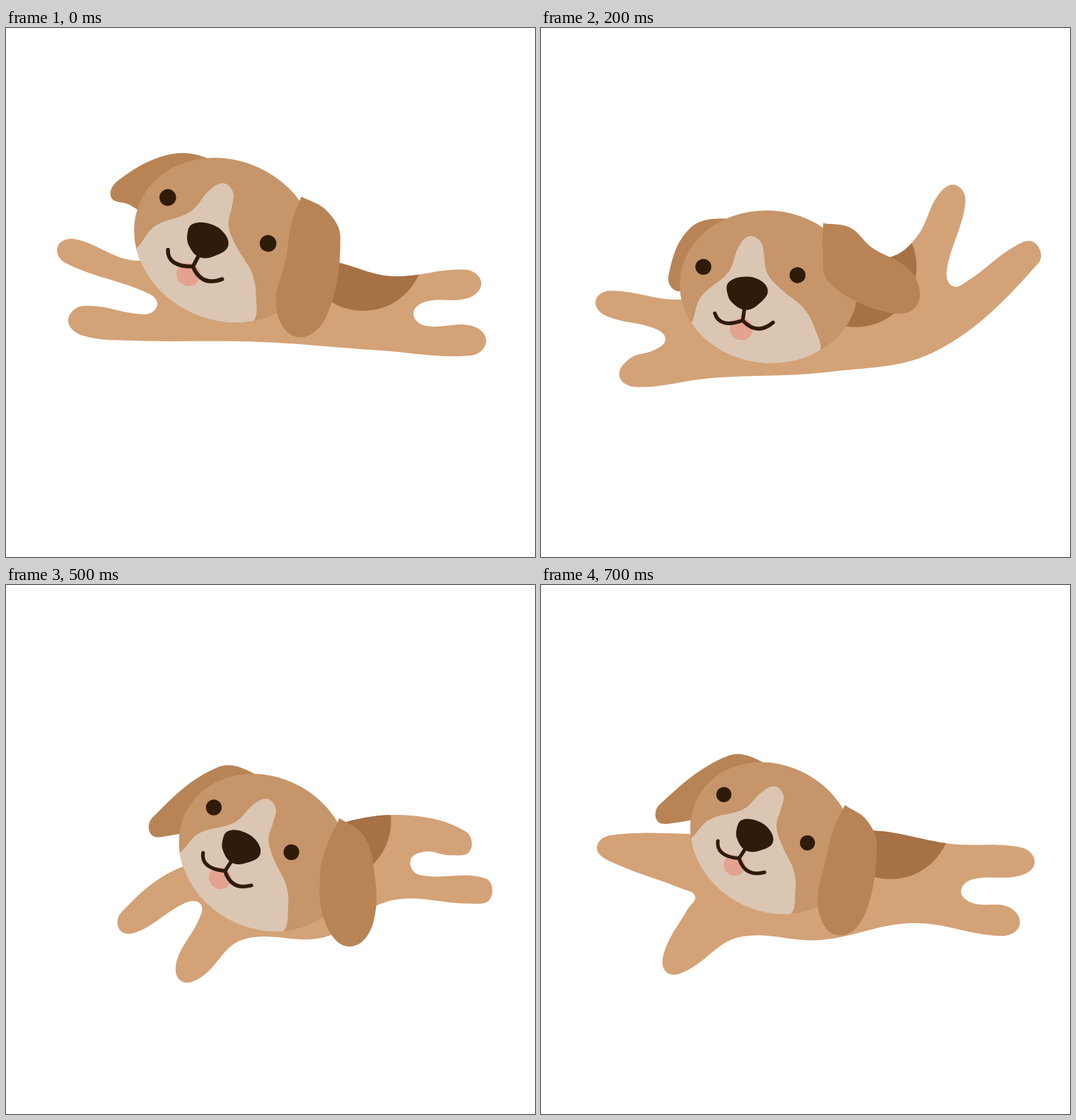
An HTML page with a canvas that plays this animation: 748 by 748 pixels, repeating every 800 ms.

```html
<!DOCTYPE html>
<html lang="en">
<head>
<meta charset="utf-8">
<title>Running puppy</title>
<style>
  html, body { margin: 0; width: 100%; height: 100%; overflow: hidden; background: #fff; }
  canvas { display: block; width: 100%; height: 100%; }
</style>
</head>
<body>
<canvas id="stage" width="748" height="748"></canvas>
<script>
const SIZE = 748, STEP = 100;
const ctx = document.getElementById('stage').getContext('2d');

const COLOR = {
  body: '#d4a277', patch: '#a57145', ear: '#b88456', head: '#c69569',
  muzzle: '#dbc6b4', dark: '#2f1b0a', tongue: '#e4a290'
};

// Paws and the gaps between legs are rounded tips: x, y, heading in degrees.
// Ear tips are relative to the head; turn is the distance between the eyes.
const reach = {
  head: { x: 310, y: 300, tilt: 24.6, size: 1, turn: 156 },
  farTip: [-172, 12], nearTip: [150, 82], saddle: [505, 314],
  shoulder: [187, 329],
  front: [[73, 309, 200], [214, 391, 5], [88, 414, 180]],
  belly: [[180, 442], [360, 444], [530, 456]],
  hind: [[679, 442, 0], [576, 404, 180], [672, 360, -5]],
  back: [[545, 351], [467, 331]]
};
const kick = {
  head: { x: 313, y: 325, tilt: 27, size: 0.98, turn: 145 },
  farTip: [-167, 60], nearTip: [163, 58], saddle: [462, 290],
  shoulder: [188, 341],
  front: [[69, 358, 181], [192, 404, 0], [105, 450, 170]],
  belly: [[260, 448], [430, 462], [590, 447]],
  hind: [[698, 362, -35], [588, 389, 133], [630, 258, -55]],
  back: [[549, 317], [476, 336]]
};
const lift = {
  head: { x: 322, y: 366, tilt: 5, size: 0.955, turn: 140 },
  farTip: [-135, 18], nearTip: [220, 10], saddle: [445, 337],
  shoulder: [196, 384],
  front: [[77, 386, 190], [176, 440, 0], [111, 493, 165]],
  belly: [[240, 495], [410, 486], [560, 456]],
  hind: [[697, 303, -58], [582, 365, 115], [586, 222, -75]],
  back: [[533, 293], [497, 323]]
};
const glide = {
  head: { x: 367, y: 345, tilt: 30, size: 1, turn: 134 },
  farTip: [-155, 60], nearTip: [178, 65], saddle: [420, 355],
  shoulder: [241, 370],
  front: [[117, 450, 155], [240, 430, -40], [197, 540, 125]],
  belly: [[292, 487], [450, 499], [565, 425]],
  hind: [[734, 378, 15], [551, 348, 165], [645, 271, -5]],
  back: [[545, 277], [507, 315]]
};
const land = {
  head: { x: 363, y: 412, tilt: 30, size: 0.89, turn: 134 },
  farTip: [-165, 62], nearTip: [185, 50], saddle: [497, 313],
  shoulder: [250, 430],
  front: [[206, 527, 122], [310, 472, -40], [298, 580, 122]],
  belly: [[377, 516], [450, 497], [521, 468]],
  hind: [[635, 510, 50], [593, 430, 225], [667, 481, 70]],
  back: [[600, 375], [458, 354]]
};
const push = {
  head: { x: 327, y: 358, tilt: 30, size: 0.91, turn: 150 },
  farTip: [-168, 66], nearTip: [163, 80], saddle: [494, 330],
  shoulder: [211, 352],
  front: [[79, 371, 183], [218, 440, -15], [178, 548, 128]],
  belly: [[280, 498], [395, 502], [525, 478]],
  hind: [[677, 480, 12], [594, 433, 180], [698, 393, 5]],
  back: [[580, 366], [465, 347]]
};

function between(a, b) {
  if (typeof a === 'number') return (a + b) / 2;
  if (Array.isArray(a)) return a.map((v, i) => between(v, b[i]));
  return Object.fromEntries(Object.keys(a).map(k => [k, between(a[k], b[k])]));
}

const POSES = [reach, kick, lift, between(lift, glide), glide, between(glide, land), land, push];

// Three points round a tip; a negative radius runs the other way.
function bend(x, y, angle, r) {
  const c = Math.cos(angle), s = Math.sin(angle), size = Math.abs(r);
  const bx = x - c * size, by = y - s * size;
  return [[bx - s * r, by + c * r], [x, y], [bx + s * r, by - c * r]];
}

// Smooth closed curve; handles scale with each segment.
function curve(pts) {
  const n = pts.length;
  const at = i => pts[(i + n) % n];
  const dir = i => {
    const [ax, ay] = at(i - 1), [bx, by] = at(i + 1);
    const len = Math.hypot(bx - ax, by - ay) || 1;
    return [(bx - ax) / len, (by - ay) / len];
  };
  const path = new Path2D();
  path.moveTo(...pts[0]);
  for (let i = 0; i < n; i++) {
    const [px, py] = at(i), [qx, qy] = at(i + 1);
    const [ux, uy] = dir(i), [vx, vy] = dir(i + 1);
    const h = Math.hypot(qx - px, qy - py) * 0.36;
    path.bezierCurveTo(px + ux * h, py + uy * h, qx - vx * h, qy - vy * h, qx, qy);
  }
  path.closePath();
  return path;
}

function oval(x, y, rx, ry = rx) {
  const path = new Path2D();
  path.ellipse(x, y, rx, ry, 0, 0, Math.PI * 2);
  return path;
}

function fill(path, color, clip) {
  ctx.save();
  if (clip) ctx.clip(clip);
  ctx.fillStyle = color;
  ctx.fill(path);
  ctx.restore();
}

const HEAD = oval(0, 0, 132, 113);
const MUZZLE = curve([
  [-36, -72], [-18, -66], [-11, -46], [-4, -20], [20, 3], [52, 25], [71, 51], [82, 92],
  [20, 140], [-140, 110], [-110, 65], [-99, 24], [-61, -17], [-50, -54]
]);
const NOSE = curve([
  [-29, -13], [-11, -23], [14, -22], [30, -7], [21, 12], [1, 25], [-21, 16], [-30, 0]
]);
const MOUTH = new Path2D('M-45 34Q-36 56-3 41Q20 62 42 40M-2 22L-3 41');
const TONGUE = oval(-4, 54, 17, 16);

function drawBody({ head, saddle, shoulder, front, belly, hind, back }) {
  const leg = (tips, radii) =>
    tips.flatMap(([x, y, deg], i) => bend(x, y, deg * Math.PI / 180, radii[i]));
  const body = curve([
    shoulder, ...leg(front, [18, -15, 21]),
    ...belly, ...leg(hind, [21, -17, 20]),
    ...back, [head.x, head.y]
  ]);
  fill(body, COLOR.body);
  fill(oval(...saddle, 86), COLOR.patch, body);
}

function drawFarEar([x, y]) {
  const tip = bend(x, y, Math.atan2(y + 40, x + 124), 18);
  fill(curve([[-70, -95], [-124, -76], ...tip, [-95, 10], [-20, -80]]), COLOR.ear);
}

function drawNearEar([x, y]) {
  const root = [72, -101];
  const tip = bend(x, y, Math.atan2(y + 60, x - 110), -36);
  fill(curve([root, root, [112, -98], [146, -72], ...tip, [88, -15], [75, -62]]), COLOR.ear);
}

function drawFace(turn) {
  const eye = -99;
  ctx.save();
  ctx.translate(eye + turn / 2 - 2, 12);
  fill(TONGUE, COLOR.tongue);
  ctx.strokeStyle = COLOR.dark;
  ctx.lineWidth = 5.5;
  ctx.lineCap = ctx.lineJoin = 'round';
  ctx.stroke(MOUTH);
  fill(NOSE, COLOR.dark);
  ctx.restore();
  for (const x of [eye, eye + turn]) fill(oval(x, -21, 11.8), COLOR.dark);
}

function drawHead({ head, farTip, nearTip }) {
  ctx.save();
  ctx.translate(head.x, head.y);
  ctx.rotate(head.tilt * Math.PI / 180);
  ctx.scale(head.size, head.size);
  drawFarEar(farTip);
  fill(HEAD, COLOR.head);
  fill(MUZZLE, COLOR.muzzle, HEAD);
  drawNearEar(nearTip);
  drawFace(head.turn);
  ctx.restore();
}

function tick() {
  const pose = POSES[Math.floor(performance.now() / STEP) % POSES.length];
  ctx.fillStyle = '#fff';
  ctx.fillRect(0, 0, SIZE, SIZE);
  drawBody(pose);
  drawHead(pose);
  requestAnimationFrame(tick);
}
tick();
</script>
</body>
</html>
```
